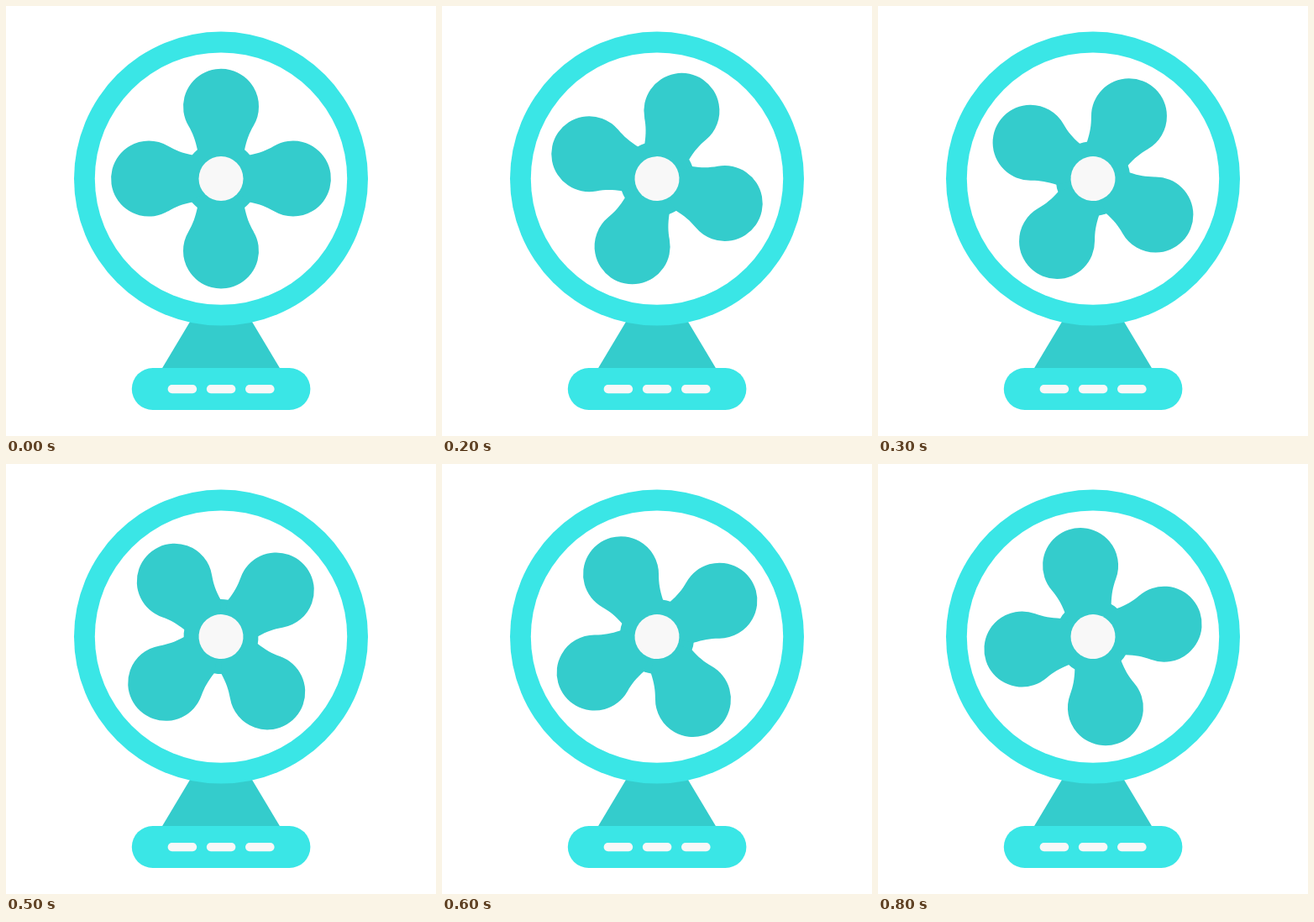
An HTML page with a canvas that plays this animation: 512 by 512 pixels, repeating every 900 ms.

```html
<!DOCTYPE html>
<html lang="en">
<head>
<meta charset="utf-8">
<title>Fan</title>
<style>
  html, body { margin: 0; width: 100%; height: 100%; overflow: hidden; background: #fff; }
  canvas { display: block; width: 512px; height: 512px; }
</style>
</head>
<body>
<canvas id="stage" width="512" height="512"></canvas>
<script>
const ctx = document.getElementById('stage').getContext('2d');
const LIGHT = '#3ae6e6', DARK = '#34cccc', PALE = '#f8f8f8';
const CX = 256, CY = 205.6;
const LOOP = 900, STEP = 100, TURN = Math.PI / 18;

function disc(x, y, r, color) {
  ctx.fillStyle = color;
  ctx.beginPath();
  ctx.arc(x, y, r, 0, Math.PI * 2);
  ctx.fill();
}

function bar(x, y, w, h, color) {
  ctx.fillStyle = color;
  ctx.beginPath();
  ctx.roundRect(x, y, w, h, h / 2);
  ctx.fill();
}

// One blade pointing up, with the hub at the origin.
function makeBlade() {
  const p = new Path2D();
  const a = Math.atan2(23, 39);
  p.moveTo(0, 0);
  p.lineTo(-28, -34);
  p.bezierCurveTo(-30.5, -46, -33.5, -54, -38.8, -63);
  p.arc(0, -85.9, 45, Math.PI - a, a);
  p.bezierCurveTo(33.5, -54, 30.5, -46, 28, -34);
  p.closePath();
  return p;
}
const blade = makeBlade();

function drawStand() {
  ctx.fillStyle = DARK;
  ctx.beginPath();
  ctx.moveTo(222, 371);
  ctx.lineTo(290, 371);
  ctx.lineTo(326.5, 432);
  ctx.lineTo(185.5, 432);
  ctx.fill();
  bar(149.8, 431, 212.6, 50, LIGHT);
  for (let i = 0; i < 3; i++) bar(192.6 + i * 46.2, 451, 34.6, 10.2, PALE);
}

function drawRotor(angle) {
  ctx.save();
  ctx.translate(CX, CY);
  ctx.rotate(angle);
  disc(0, 0, 44.5, DARK);
  for (let i = 0; i < 4; i++) {
    ctx.fill(blade);
    ctx.rotate(Math.PI / 2);
  }
  disc(0, 0, 26.5, PALE);
  ctx.restore();
}

function draw(now) {
  ctx.fillStyle = '#fff';
  ctx.fillRect(0, 0, 512, 512);
  drawStand();
  disc(CX, CY, 175, LIGHT);
  disc(CX, CY, 150.2, '#fff');
  // The rotor ticks ten degrees at a time; a quarter turn closes the loop.
  drawRotor(Math.floor((now % LOOP) / STEP) * TURN);
}

function tick() {
  draw(performance.now());
  requestAnimationFrame(tick);
}
tick();
</script>
</body>
</html>
```
